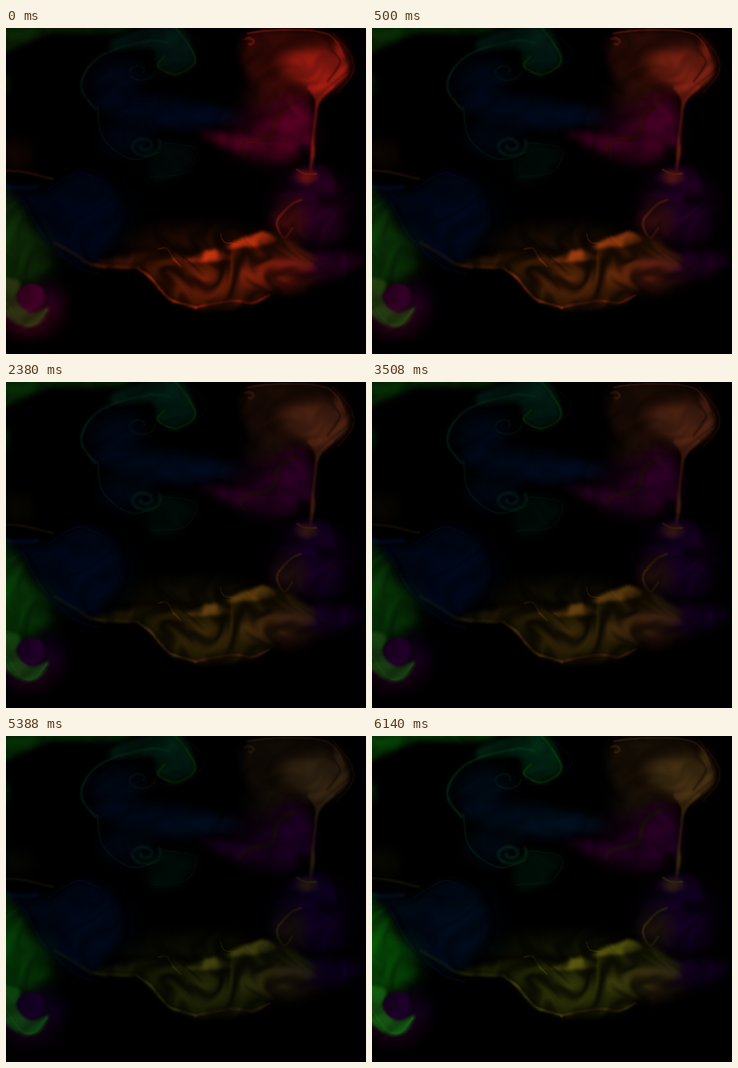
Write an HTML page with a canvas that moves like this. It is 732 px wide and 664 px high and loops after 8000 ms.

```html
<!DOCTYPE html>
<html>
<head>
<meta charset="utf-8">
<style>
html, body { margin: 0; width: 100%; height: 100%; overflow: hidden; background: #000; }
canvas { display: block; }
</style>
</head>
<body>
<canvas id="c" width="732" height="664"></canvas>
<script>
const W = 732, H = 664, LOOP = 8000;
const ctx = document.getElementById('c').getContext('2d', { willReadFrequently: true });

// start time, then red, green and blue gains
const steps = [
  [0, 1, 1, 1],
  [500, .78, 1.2, 1.04],
  [2380, .49, 1.24, 1.04],
  [4260, .32, 1.28, 1],
  [6140, .44, 1.75, 1.06]
];

const green = [14, 46, 7], lime = [42, 50, 16], teal = [4, 30, 25], navy = [0, 9, 30];
const red = [155, 28, 18], maroon = [50, 9, 6], wine = [82, 0, 33], plum = [46, 1, 36];
const fire = [140, 36, 11], rust = [62, 19, 4], black = [0, 0, 2];

const rgba = (color, a) => `rgba(${color},${a})`;

// Smooth curve through "x,y x,y ..."
function curve(text, closed) {
  const p = text.split(' ').map(s => s.split(',').map(Number));
  const n = p.length, path = new Path2D();
  const at = i => closed ? p[(i + n) % n] : p[Math.max(0, Math.min(n - 1, i))];
  path.moveTo(...p[0]);
  for (let i = 0; i < (closed ? n : n - 1); i++) {
    const [a, b, c, d] = [at(i - 1), at(i), at(i + 1), at(i + 2)];
    path.bezierCurveTo(b[0] + (c[0] - a[0]) / 6, b[1] + (c[1] - a[1]) / 6,
      c[0] - (d[0] - b[0]) / 6, c[1] - (d[1] - b[1]) / 6, ...c);
  }
  return path;
}

function shape(color, a, blur, text) {
  ctx.filter = `blur(${blur}px)`;
  ctx.fillStyle = rgba(color, a);
  ctx.fill(curve(text, true));
}

function strand(color, a, width, path) {
  ctx.filter = `blur(${width / 3}px)`;
  ctx.strokeStyle = rgba(color, a);
  ctx.lineWidth = width;
  ctx.stroke(typeof path === 'string' ? curve(path) : path);
}

function spiral(color, a, width, x, y, r, turns, angle) {
  const path = new Path2D();
  for (let k = 0; k <= 1; k += .02) {
    const t = angle + k * turns * 2 * Math.PI, d = r * (1 - .8 * k);
    path.lineTo(x + d * Math.cos(t), y + .7 * d * Math.sin(t));
  }
  strand(color, a, width, path);
}

function glow(color, a, x, y, rx, ry = rx) {
  ctx.save();
  ctx.filter = 'none';
  ctx.translate(x, y);
  ctx.scale(rx, ry);
  const g = ctx.createRadialGradient(0, 0, 0, 0, 0, 1);
  for (let i = 0; i <= 1; i += .125) g.addColorStop(i, rgba(color, a * (1 - i * i) ** 2));
  ctx.fillStyle = g;
  ctx.fillRect(-1, -1, 2, 2);
  ctx.restore();
}

function drawTeal() {
  shape(green, .5, 6, '-20,-20 245,-20 235,8 150,10 85,12 30,36 -20,50');
  glow(green, .5, 10, 8, 90, 26);
  glow(green, .3, 0, 115, 18, 34);
  glow(navy, .65, 225, 110, 85, 75);
  shape(teal, .5, 5, '225,20 345,-8 383,65 340,92 308,75 295,42 215,45');
  glow(teal, .5, 340, 30, 40, 45);
  strand(teal, .6, 5, '182,165 153,115 190,57 285,27 330,30');
  strand(green, .55, 4, '345,0 384,64 345,95 309,78 322,57');
  strand(teal, .25, 2, '370,10 405,52 360,96 315,98');
  spiral(teal, .35, 4, 272, 88, 32, 1.1, 0);

  shape(navy, .6, 10, '180,155 240,137 370,147 485,185 360,206 245,187');
  glow(navy, .7, 370, 177, 110, 32);
  glow(navy, .5, 245, 225, 85, 60);
  shape(teal, .25, 8, '300,238 385,247 352,302 290,308');
  strand(teal, .5, 3, '186,160 198,225 255,267 314,252');
  spiral(teal, .55, 6, 281, 240, 34, 1.6, -.5);
  strand(teal, .35, 2, '320,235 386,246 365,294 292,303');
}

function drawWine() {
  glow(maroon, 1, 560, 130, 100, 80);
  glow(wine, .5, 540, 215, 130, 95);
  shape(wine, .5, 8, '395,210 505,217 555,137 615,135 622,238 560,270 465,253');
  shape(wine, .8, 7, '551,232 574,155 604,150 619,235 590,246');
  shape(wine, .7, 7, '413,215 497,228 490,249 460,241');
  strand(maroon, .8, 8, '592,151 553,175 540,217 486,233 478,248');
  strand(wine, .6, 3, '485,262 490,234 552,237 586,230');
  shape(black, .7, 6, '596,238 618,242 614,278 592,259');
}

function drawRed() {
  shape(maroon, .8, 9, '488,16 640,10 690,35 694,98 620,130 505,110');
  shape(maroon, .8, 12, '515,15 635,12 681,80 535,70');
  shape(red, .75, 12, '556,80 585,48 640,45 687,70 672,113 640,128 600,104');
  glow(red, .6, 630, 85, 70, 42);
  shape(red, .7, 4, '667,24 688,60 692,95 650,128 630,118 672,90');
  strand(maroon, .7, 4, '654,38 678,68 654,108');
  strand(red, .55, 3, '490,12 560,4 655,12 687,60');
  spiral(red, .5, 4, 494, 30, 14, .7, 4);
  strand(maroon, .9, 3, '664,9 699,53 705,91 675,132');
  shape(red, .7, 2, '614,118 668,118 637,155 627,222 628,253 621,292 617,290 622,224 630,150');
}

function drawPlum() {
  glow(plum, .65, 622, 365, 115, 110);
  shape(plum, .6, 5, '575,312 594,286 655,286 667,334 610,325');
  shape(plum, .5, 9, '565,345 652,345 682,425 563,420');
  shape(plum, .8, 10, '540,480 635,458 725,470 650,508');
  glow(maroon, .9, 578, 395, 55, 70);
  shape(black, .6, 5, '635,340 678,355 643,360');
  glow(red, .65, 610, 303, 32, 22);
  strand(fire, .7, 3, '590,288 608,297 631,297');
  strand(fire, .55, 4, '600,350 578,361 552,395 566,427 583,408');
}

function drawFire() {
  const body = '180,480 264,462 344,462 431,450 525,418 592,442 628,480 546,526 502,562 385,571 322,544 295,510 267,490';
  glow(rust, .4, 388, 439, 210, 62);
  shape(rust, .7, 6, body);
  glow(red, .4, 560, 500, 100, 60);
  glow(fire, .35, 400, 520, 90, 50);
  glow(fire, .3, 490, 500, 45, 50);
  shape(fire, .9, 3, '364,472 422,450 455,470 400,474');
  shape(fire, .9, 3, '446,450 488,427 526,416 549,433 502,446');
  strand(fire, .6, 3, '309,451 327,450 339,470 355,487');
  strand(fire, .6, 2, '474,443 445,437 438,419');
  strand(fire, .7, 5, '267,489 295,510 330,552 385,569');
  strand(red, .45, 5, '385,568 457,555 500,561 534,545');
  strand(rust, .9, 6, '99,438 139,459 180,482 267,488');
}

function drawLeft() {
  glow(navy, .5, 180, 386, 115, 115);
  shape(navy, .55, 10, '-15,318 77,334 147,296 205,315 230,400 165,480 91,445 43,365');
  strand(navy, .9, 8, '-5,321 22,326 62,323');
  strand(navy, .6, 3, '85,331 144,295 196,312');
  strand(navy, .6, 4, '35,350 79,426 140,483 188,499');
  glow(rust, .25, 20, 258, 55, 48);
  strand(rust, .5, 5, '0,290 39,294 94,308');

  glow(green, .4, 50, 470, 80, 90);
  shape(green, .5, 9, '-20,330 9,337 55,406 88,478 45,518 -20,530');
  glow(green, .9, 5, 430, 55, 100);
  glow(wine, .75, 47, 585, 92, 66);
  glow(plum, .5, 86, 550, 58, 55);
  shape(lime, .85, 3, '-12,512 23,514 30,528 22,549 50,579 85,570 64,607 22,603 -12,568');
  strand(lime, 1, 3, '0,558 31,600 60,602 82,574');
  ctx.filter = 'blur(2px)';
  ctx.fillStyle = rgba([60, 0, 35], .95);
  ctx.beginPath();
  ctx.arc(51, 549, 28, 0, 7);
  ctx.fill();
}

// Stir the soft shapes and streak them, most strongly inside the fire
function stir() {
  const src = ctx.getImageData(0, 0, W, H).data, out = new Float32Array(src.length);
  for (let y = 0, i = 0; y < H; y++) for (let x = 0; x < W; x++, i += 4) {
    let u = x, v = y;
    for (let f = .025; f < .25; f *= 1.8) {
      u += .65 / f * Math.sin(v * f + 900 * f);
      v += .65 / f * Math.sin(u * f * 1.1 + 500 * f);
    }
    const churn = Math.exp(-(((x - 430) / 200) ** 2) - ((y - 490) / 80) ** 2);
    const shade = 1 + (.14 + .45 * churn) * Math.sin(u * .06 + v * .09);
    const pull = .02 + .05 * churn;
    const sx = Math.max(0, Math.min(W - 1, Math.round(x + (u - x) * pull)));
    const sy = Math.max(0, Math.min(H - 1, Math.round(y + (v - y) * pull)));
    for (let k = 0; k < 3; k++) out[i + k] = src[(sy * W + sx) * 4 + k] * shade;
  }
  return out;
}

ctx.fillRect(0, 0, W, H);
ctx.lineCap = ctx.lineJoin = 'round';
[drawTeal, drawWine, drawRed, drawPlum, drawFire, drawLeft].forEach(draw => draw());
const smoke = stir(), picture = ctx.createImageData(W, H);

function paint([, ...gain]) {
  for (let i = 0; i < smoke.length; i += 4) {
    for (let k = 0; k < 3; k++) picture.data[i + k] = smoke[i + k] * gain[k];
    picture.data[i + 3] = 255;
  }
  ctx.putImageData(picture, 0, 0);
}

const start = performance.now();
let shown;
function tick() {
  const t = (performance.now() - start) % LOOP;
  const step = steps.filter(s => s[0] <= t).pop();
  if (step !== shown) paint(shown = step);
  requestAnimationFrame(tick);
}
tick();
</script>
</body>
</html>
```
